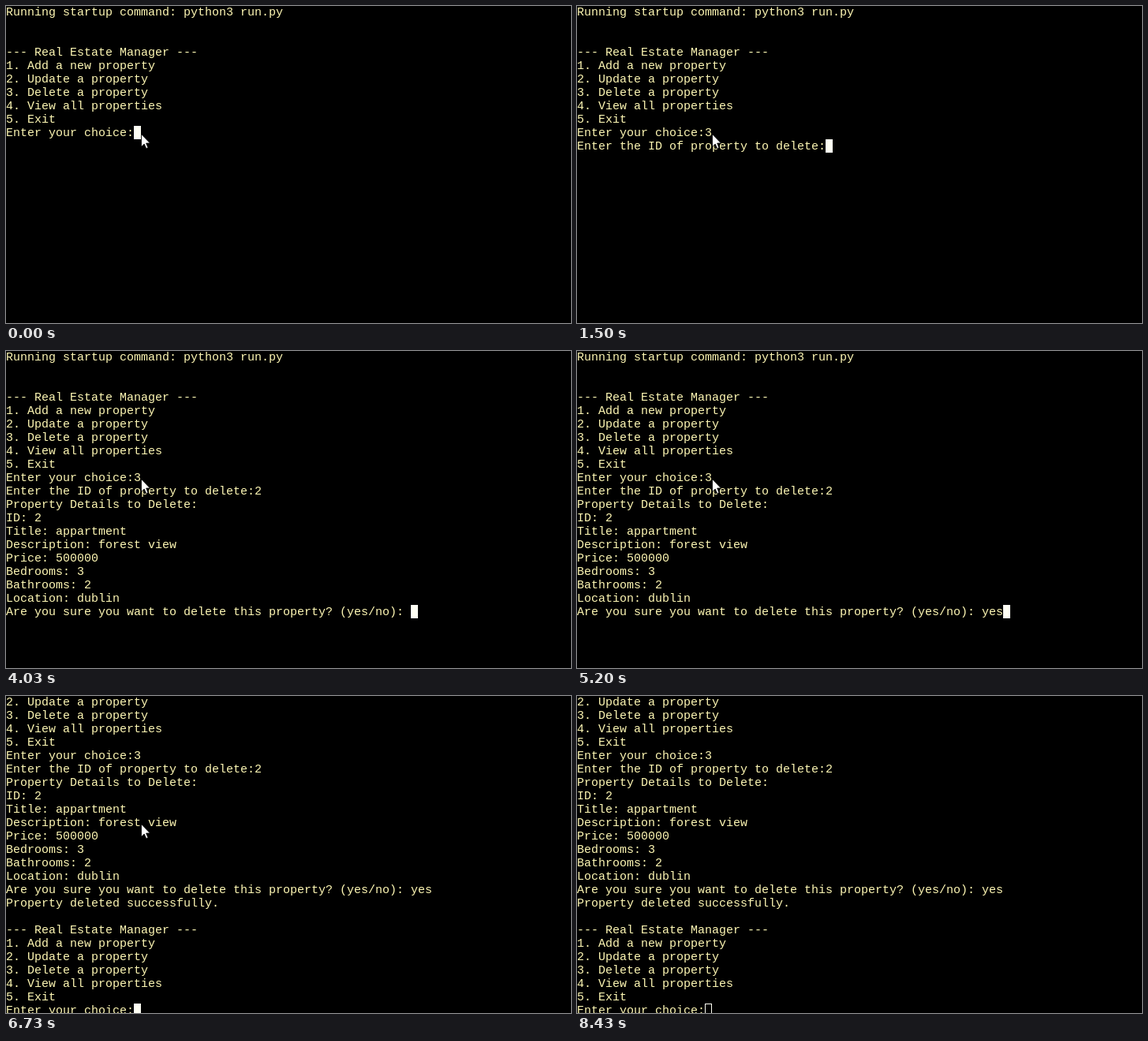
These frames come from a looping animation (716 by 402 pixels, 8510 ms). An HTML page:

```html
<!DOCTYPE html>
<html lang="en">
<head>
<meta charset="utf-8">
<title>Terminal session</title>
<style>
html, body { margin: 0; width: 100%; height: 100%; overflow: hidden; background: #000; }
#stage { position: relative; width: 716px; height: 402px; overflow: hidden; background: #000; }
#screen {
  position: absolute; left: 0; top: 0; margin: 0;
  font: 15px/17px "Liberation Mono", "Courier New", monospace;
  color: #fff8b4; white-space: pre;
}
#cursor { position: absolute; width: 9px; height: 17px; box-sizing: border-box; border: 1px solid #fffff4; }
#pointer { position: absolute; left: 0; top: 0; overflow: visible; }
</style>
</head>
<body>
<div id="stage">
  <pre id="screen"></pre>
  <div id="cursor"></div>
  <svg id="pointer" width="12" height="20">
    <path d="M.5 .5V16.5L4.2 13L6.7 18.7L9 17.7L6.6 12H11.5Z" fill="#fff" stroke="#000" stroke-width=".8"/>
  </svg>
</div>
<script>
const LOOP = 8510, COL = 9, ROW = 17, ROWS = 24;
const $ = id => document.getElementById(id);
const screenEl = $('screen'), cursor = $('cursor'), pointer = $('pointer');

const menu = `--- Real Estate Manager ---
1. Add a new property
2. Update a property
3. Delete a property
4. View all properties
5. Exit
Enter your choice:`;

const details = `
Property Details to Delete:
ID: 2
Title: appartment
Description: forest view
Price: 500000
Bedrooms: 3
Bathrooms: 2
Location: dublin
Are you sure you want to delete this property? (yes/no): `;

// Terminal output: [time, appended text]
const output = [
  [0, 'Running startup command: python3 run.py\n\n\n' + menu],
  [530, '3'],
  [1500, '\nEnter the ID of property to delete:'],
  [2870, '2'],
  [3500, details],
  [4970, 'y'],
  [5100, 'e'],
  [5200, 's'],
  [6130, '\nProperty deleted successfully.\n\n' + menu]
];

// Mouse positions: [time, x, y]; the last one is off stage
const moves = [
  [0, 171, 162], [6970, 170, 162], [7000, 169, 162],
  [7330, 186, 163], [7370, 270, 165], [7400, 430, 163],
  [7430, 636, 153], [7470, 730, 150]
];

let shown;

function draw(t) {
  const text = output.filter(o => o[0] <= t).map(o => o[1]).join('');
  const lines = text.split('\n');
  const first = Math.max(0, lines.length - ROWS);
  if (text !== shown) {
    screenEl.textContent = lines.slice(first).join('\n');
    shown = text;
  }
  cursor.style.left = lines[lines.length - 1].length * COL + 'px';
  cursor.style.top = (lines.length - 1 - first) * ROW - 1 + 'px';
  cursor.style.background = t < 8430 ? '#fffff4' : 'none';

  const [, x, y] = moves.filter(m => m[0] <= t).pop();
  pointer.style.transform = `translate(${x}px, ${y}px)`;
}

const start = performance.now();
function tick() {
  draw((performance.now() - start) % LOOP);
  requestAnimationFrame(tick);
}
tick();
</script>
</body>
</html>
```
